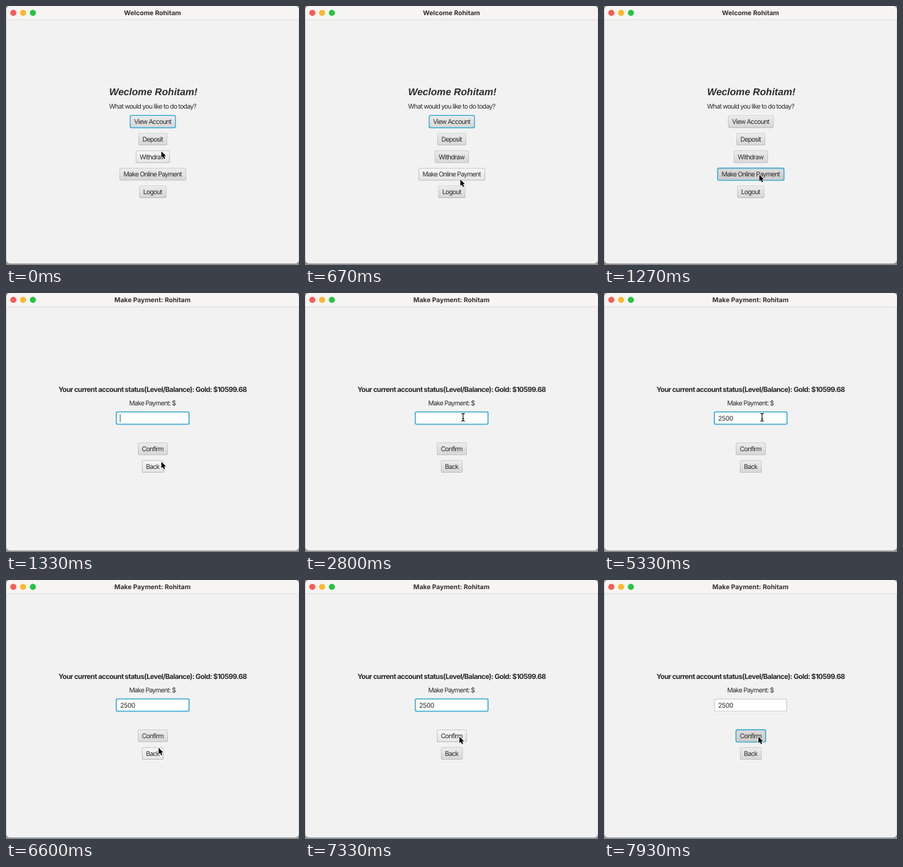
These frames come from a looping animation (480x424 px, 8 s). An HTML page with a canvas:

```html
<!DOCTYPE html>
<html lang="en">
<head>
<meta charset="utf-8">
<title>Payment</title>
<style>
html, body { margin: 0; width: 100%; height: 100%; overflow: hidden; background: #8f8f8f; }
canvas { display: block; width: 480px; height: 424px; }
</style>
</head>
<body>
<canvas id="stage"></canvas>
<script>
const LOOP = 8000;
const STEP = 1000 / 15;
const MID = 240.5;
const ROW = 28.7;
const USER = 'Rohitam';
const INK = '#2b2b2b';
const BLUE = '#35a8d1';
const GLOW = 'rgba(53,168,209,0.32)';
const UI = 'Inter, "Open Sans", sans-serif';
const HEAD = '"Liberation Sans", Arial, sans-serif';

const BODY = { font: `400 10.66px ${UI}`, spacing: -0.74 };
const TITLE = { font: `700 10.6px ${UI}`, color: '#303030' };
const STATUS = { font: `700 11.5px ${UI}`, spacing: -0.6 };
const HEADING = { font: `italic 700 16.1px ${HEAD}` };
const ENTRY = { font: `400 10.66px ${UI}`, spacing: -0.4, align: 'left' };

const MENU = ['View Account', 'Deposit', 'Withdraw', 'Make Online Payment', 'Logout'];
const FORM = ['Confirm', 'Back'];
const FIELD = { x: 180.5, y: 194.5, w: 119.5, h: 20.5 };

// Moments of the story, in ms
const PRESS_MENU = 1195;
const OPEN_FORM = 1330;
const FOCUS = 1262;
const KEYS = [3900, 4300, 4700, 4830];
const PRESS_CONFIRM = 7862;

// Pointer moves: each is a Bezier curve that starts where the last one ended
const ORIGIN = [254, 237.6];
const MOVES = [
  { from: 0, to: 533, curve: [[292, 110], [291, 145], [254, 285]] },
  { from: 600, to: 867, curve: [[254, 276]] },
  { from: 1400, to: 1867, curve: [[259, 203.5]] },
  { from: 6200, to: 6600, curve: [[310, 156], [307, 215], [249.5, 274.4]] },
  { from: 6600, to: 7067, curve: [[246, 284], [250, 262], [252.5, 256.2]] }
];

const canvas = document.getElementById('stage');
const ratio = window.devicePixelRatio || 1;
canvas.width = 480 * ratio;
canvas.height = 424 * ratio;
const ctx = canvas.getContext('2d');

const mix = (a, b, k) => a.map((v, i) => v + (b[i] - v) * k);
const ease = k => k * k * (3 - 2 * k);
const inside = (p, b) => p.x >= b.x && p.x <= b.x + b.w && p.y >= b.y && p.y <= b.y + b.h;

function bezier(points, k) {
  while (points.length > 1) {
    points = points.slice(1).map((p, i) => mix(points[i], p, k));
  }
  return points[0];
}

function pointerAt(t) {
  let spot = ORIGIN;
  for (const { from, to, curve } of MOVES) {
    if (t < from) break;
    spot = bezier([spot, ...curve], ease(Math.min(1, (t - from) / (to - from))));
  }
  return { x: spot[0], y: spot[1] };
}

function textWidth(str, { font, spacing = 0 }) {
  ctx.font = font;
  ctx.textRendering = 'geometricPrecision';
  ctx.letterSpacing = spacing + 'px';
  return ctx.measureText(str).width - spacing;
}

function text(str, x, y, style) {
  const w = textWidth(str, style);
  ctx.fillStyle = style.color || INK;
  ctx.fillText(str, style.align === 'left' ? x : x - w / 2, y);
}

function box(b, grow, radius, fill) {
  ctx.beginPath();
  ctx.roundRect(b.x - grow, b.y - grow, b.w + 2 * grow, b.h + 2 * grow, radius);
  ctx.fillStyle = fill;
  ctx.fill();
}

function fade(b, top, bottom) {
  const g = ctx.createLinearGradient(0, b.y, 0, b.y + b.h);
  g.addColorStop(0, top);
  g.addColorStop(1, bottom);
  return g;
}

function border(b, focused, plain) {
  if (focused) {
    box(b, 1.1, 3.5, GLOW);
    box(b, 0.5, 3, BLUE);
  } else {
    box(b, 0, 2.5, plain);
  }
}

function button(label, cy, pointer, focused, pressed) {
  const w = textWidth(label, BODY) + 12.7;
  const b = { x: MID - w / 2, y: cy - 10.1, w, h: 20.2 };
  let tones = ['#ececec', '#d6d6d6'];
  if (pressed) tones = ['#dcdcdc', '#c9c9c9'];
  else if (inside(pointer, b)) tones = ['#f7f7f7', '#e5e5e5'];
  border(b, focused, fade(b, '#c2c2c2', '#a9a9a9'));
  box(b, -0.85, 2, pressed ? '#d4d4d4' : fade(b, '#fbfbfb', '#e2e2e2'));
  box(b, -1.6, 1.6, fade(b, ...tones));
  text(label, MID, cy + 3.8, BODY);
}

function buttons(labels, top, pointer, focus, pressed) {
  labels.forEach((label, i) =>
    button(label, top + ROW * i, pointer, i === focus, pressed && i === focus));
}

function field(t, focused) {
  border(FIELD, focused, '#bdbdbd');
  box(FIELD, -0.85, 2, focused ? '#d6eef6' : fade(FIELD, '#f1f1f1', '#fff'));
  box(FIELD, -1.7, 1.5, '#fff');
  const typed = KEYS.filter(at => t >= at).length;
  text('2500'.slice(0, typed), 186.9, 208.7, ENTRY);
  // The caret blinks each half second, counted from the latest key
  const since = typed ? KEYS[typed - 1] : FOCUS;
  if (focused && Math.floor((t - since) / 500) % 2 === 0) {
    ctx.fillStyle = '#222';
    ctx.fillRect(186.6 + 6.22 * typed, 198.3, 0.9, 13.2);
  }
}

function arrow({ x, y }) {
  ctx.save();
  ctx.translate(x + 0.5, y + 0.3);
  ctx.beginPath();
  [[0, 0], [0, 10.6], [2.4, 8.4], [4.1, 12.3], [6, 11.5], [4.3, 7.7], [7.5, 7.6]]
    .forEach(p => ctx.lineTo(...p));
  ctx.closePath();
  ctx.lineJoin = 'round';
  ctx.lineWidth = 1.5;
  ctx.strokeStyle = '#fff';
  ctx.stroke();
  ctx.fillStyle = '#000';
  ctx.fill();
  ctx.restore();
}

function beam({ x, y }) {
  ctx.beginPath();
  for (const s of [-1, 1]) {
    ctx.moveTo(x - 2.8, y + 6.3 * s);
    ctx.quadraticCurveTo(x, y + 6.3 * s, x, y + 4.6 * s);
    ctx.quadraticCurveTo(x, y + 6.3 * s, x + 2.8, y + 6.3 * s);
  }
  ctx.moveTo(x, y - 5);
  ctx.lineTo(x, y + 5);
  ctx.moveTo(x - 1.6, y + 2.4);
  ctx.lineTo(x + 1.6, y + 2.4);
  ctx.lineWidth = 1.2;
  ctx.strokeStyle = '#111';
  ctx.stroke();
}

function frame(title) {
  ctx.fillStyle = '#8f8f8f';
  ctx.fillRect(0, 0, 480, 424);
  box({ x: 0, y: 0, w: 480, h: 422 }, 0, 6, '#b4b4b4');
  ctx.save();
  ctx.beginPath();
  ctx.roundRect(0.8, 0, 478.8, 421.3, 6);
  ctx.clip();
  ctx.fillStyle = '#f2f2f2';
  ctx.fillRect(0, 0, 480, 424);
  ctx.fillStyle = '#f7f5f4';
  ctx.fillRect(0, 0, 480, 22);
  ctx.fillStyle = '#dcdbdb';
  ctx.fillRect(0, 22, 480, 1);
  ctx.restore();
  ['#fb5b54', '#fdb92c', '#27c440'].forEach((color, i) => {
    ctx.beginPath();
    ctx.arc(12 + 16 * i, 11.2, 5, 0, 2 * Math.PI);
    ctx.fillStyle = color;
    ctx.fill();
  });
  text(title, 240, 14.5, TITLE);
}

function menuPage(t, pointer) {
  const pressed = t >= PRESS_MENU;
  frame('Welcome ' + USER);
  text(`Weclome ${USER}!`, 241.3, 145.6, HEADING);
  text('What would you like to do today?', MID, 167.7, BODY);
  buttons(MENU, 189.3, pointer, pressed ? 3 : 0, pressed);
}

function formPage(t, pointer) {
  const pressed = t >= PRESS_CONFIRM;
  frame('Make Payment: ' + USER);
  text('Your current account status(Level/Balance): Gold: $10599.68', MID, 161.5, STATUS);
  text('Make Payment: $', 240.2, 183.7, BODY);
  field(t, !pressed);
  buttons(FORM, 255.2, pointer, pressed ? 0 : -1, pressed);
}

function draw(now) {
  const t = Math.floor((now % LOOP + 4) / STEP) * STEP;
  const pointer = pointerAt(t);
  const onForm = t >= OPEN_FORM;
  ctx.setTransform(ratio, 0, 0, ratio, 0, 0);
  (onForm ? formPage : menuPage)(t, pointer);
  (onForm && inside(pointer, FIELD) ? beam : arrow)(pointer);
}

const start = performance.now();
function tick() {
  draw(performance.now() - start);
  requestAnimationFrame(tick);
}
tick();
</script>
</body>
</html>
```
